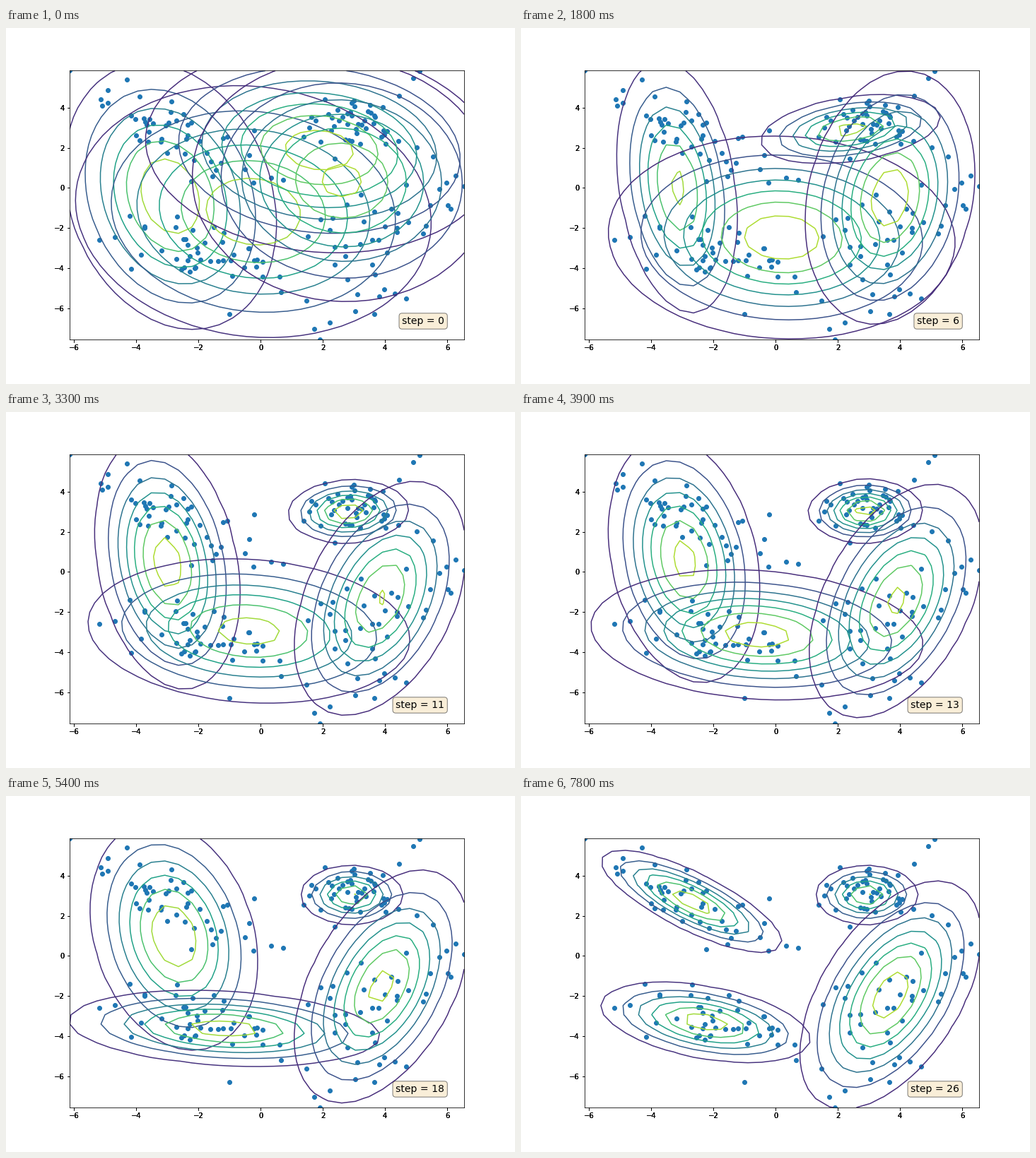
A matplotlib script for the animation above (8000 ms loop, 720 px wide and 504 px high).

```python
import numpy as np
import matplotlib.pyplot as plt
from matplotlib.animation import FuncAnimation

W, H, DPI = 720, 504, 72
LEFT, RIGHT, TOP, BOTTOM = 90, 648, 60.48, 441
XLIM, YLIM = (-6.136, 6.545), (-7.566, 5.855)
STEP_FRAMES = 3
KEY_STEPS = (0, 6, 18, 26)

# Per Gaussian: how sharply it settles, then its poses at the key steps as
# (mean x, mean y, sigma x, sigma y, correlation)
UPPER_LEFT = 1, ((-2.90, -0.41, 1.725, 3.37, -0.21),
                 (-3.16, 0.06, 1.00, 3.29, -0.25),
                 (-2.78, 1.00, 1.36, 2.90, -0.23),
                 (-2.70, 2.73, 1.481, 1.303, -0.79))
LOWER_LEFT = 1, ((-0.23, -1.18, 2.905, 3.197, -0.09),
                 (0.20, -2.47, 2.754, 2.503, -0.05),
                 (-1.16, -3.615, 2.571, 0.961, -0.21),
                 (-2.25, -3.32, 1.725, 1.025, -0.42))
UPPER_RIGHT = 3, ((1.89, 1.89, 2.77, 2.54, -0.10),
                  (2.41, 2.93, 1.49, 0.88, 0.34),
                  (2.93, 3.05, 0.85, 0.77, 0.0),
                  (2.93, 3.05, 0.85, 0.77, 0.0))
LOWER_RIGHT = 3, ((2.61, 0.37, 2.41, 3.03, -0.03),
                  (3.68, -0.48, 1.336, 3.118, 0.19),
                  (3.90, -1.52, 1.40, 2.91, 0.46),
                  (3.70, -1.95, 1.44, 2.82, 0.52))
GAUSSIANS = UPPER_LEFT, LOWER_LEFT, UPPER_RIGHT, LOWER_RIGHT

# Samples far from every cluster, some of which set the axis limits
OUTLIERS = [(-6.136, 5.855), (6.545, 0.09), (1.91, -7.566), (5.11, 5.84),
            (4.91, 5.49), (4.45, 4.6), (-4.3, 5.41), (-1.0, -6.3),
            (1.73, -7.04), (0.34, 0.51), (0.73, 0.39), (-0.2, 2.87),
            (-2.22, 0.33), (2.39, 1.46), (4.68, -5.52), (6.11, -1.04)]


def sample_points():
    rng = np.random.default_rng(4)
    groups = [np.array(OUTLIERS).T]
    for _, poses in GAUSSIANS:
        mx, my, sx, sy, rho = poses[-1]
        u, v = rng.normal(size=(2, 50))
        near = np.hypot(u, v) < 2.1
        x = mx + sx * u
        y = my + sy * (rho * u + np.sqrt(1 - rho ** 2) * v)
        groups.append(np.array([x[near], y[near]]))
    return np.hstack(groups)


def pose_at(step, settle, poses):
    i = min(np.searchsorted(KEY_STEPS, step, side="right"),
            len(KEY_STEPS) - 1) - 1
    t = (step - KEY_STEPS[i]) / (KEY_STEPS[i + 1] - KEY_STEPS[i])
    # The fit starts fast, then settles, then drifts evenly
    power = (1.5, settle, 1)[i]
    eased = 1 - (1 - t) ** power
    start, end = np.array(poses[i]), np.array(poses[i + 1])
    return start + (end - start) * eased


def density(mx, my, sx, sy, rho):
    u, v = (GX - mx) / sx, (GY - my) / sy
    rest = 1 - rho ** 2
    power = (u * u - 2 * rho * u * v + v * v) / (2 * rest)
    return np.exp(-power) / (2 * np.pi * sx * sy * np.sqrt(rest))


def add_layer():
    layer = fig.add_axes([LEFT / W, 1 - BOTTOM / H,
                          (RIGHT - LEFT) / W, (BOTTOM - TOP) / H])
    layer.set(xlim=XLIM, ylim=YLIM,
              xticks=range(-6, 7, 2), yticks=range(-6, 5, 2))
    return layer


plt.rcParams["font.family"] = "DejaVu Sans"
GX, GY = np.meshgrid(np.linspace(*XLIM, 30), np.linspace(*YLIM, 30))

fig = plt.figure(figsize=(W / DPI, H / DPI), dpi=DPI, facecolor="white")
ax = add_layer()
# Stacked axes give the tick labels their heavy edges
for _ in range(2):
    overlay = add_layer()
    overlay.patch.set_visible(False)
    overlay.spines[:].set_visible(False)

ax.scatter(*sample_points(), color="C0")
label = ax.text(0.95, 0.05, "", transform=ax.transAxes, fontsize=14,
                ha="right", va="bottom",
                bbox=dict(boxstyle="round", facecolor="wheat", alpha=0.5))
contours = []


def draw(frame):
    step = min(frame // STEP_FRAMES, KEY_STEPS[-1])
    while contours:
        contours.pop().remove()
    for settle, poses in GAUSSIANS:
        z = density(*pose_at(step, settle, poses))
        contours.append(ax.contour(GX, GY, z))
    ax.set(xlim=XLIM, ylim=YLIM)
    label.set_text(f"step = {step}")
    return [*contours, label]


animation = FuncAnimation(fig, draw, frames=80, interval=100,
                          repeat=True, repeat_delay=0, blit=False)
plt.show()
```
